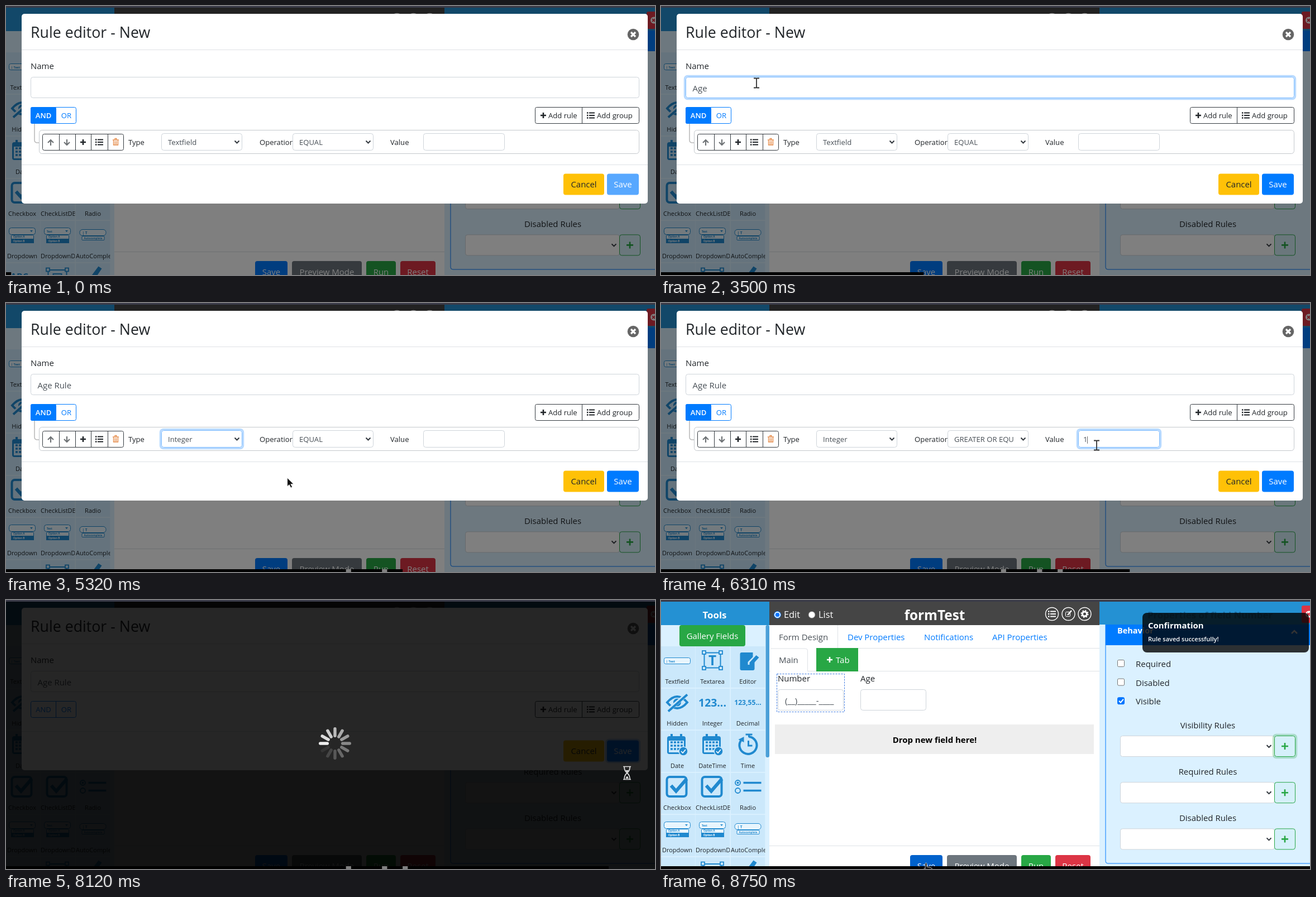
Recreate the animation shown at these times as an HTML page. Size 1162 by 482 pixels, loop 8820 ms.

```html
<!DOCTYPE html>
<html lang="en">
<head>
<meta charset="utf-8">
<title>Rule editor</title>
<style>
html, body { margin: 0; width: 100%; height: 100%; overflow: hidden; background: #000; }
svg { display: block; }
text { font-family: "Open Sans", "Noto Sans", sans-serif; white-space: pre; }
</style>
</head>
<body>
<svg id="stage" width="1162" height="482" viewBox="0 0 1162 482"></svg>
<script>
const LOOP = 8820, STEP = 70;
const BLUE = '#007bff', GREEN = '#28a745', SKY = '#2491d3', ICON = '#2089cf', INK = '#212529', GREY = '#495057', LINE = '#ced4da';
const stage = document.getElementById('stage');

// Drawing helpers, each returns SVG markup
const fill = (x, y, w, h, color, r = 0, extra = '') =>
  `<rect x="${x}" y="${y}" width="${w}" height="${h}" rx="${r}" fill="${color}" ${extra}/>`;
const box = (x, y, w, h, stroke = LINE, color = '#fff', r = 4, extra = '') =>
  fill(x + .5, y + .5, w - 1, h - 1, color, r, `stroke="${stroke}" ${extra}`);
const text = (x, y, str, size = 16, color = INK, extra = '') =>
  `<text x="${x}" y="${y}" font-size="${(size * .935).toFixed(2)}" fill="${color}" ${extra}>${str}</text>`;
const MID = 'text-anchor="middle"', BOLD = 'font-weight="700"';
const mid = (x, y, str, size, color, extra = '') => text(x, y, str, size, color, MID + ' ' + extra);
const line = (d, color, w = 1, extra = '') =>
  `<path d="${d}" fill="none" stroke="${color}" stroke-width="${w}" ${extra}/>`;
const shape = (d, color, extra = '') => `<path d="${d}" fill="${color}" ${extra}/>`;
const circle = (x, y, r, color, extra = '') => `<circle cx="${x}" cy="${y}" r="${r}" fill="${color}" ${extra}/>`;
const move = (x, y, body) => `<g transform="translate(${x} ${y})">${body}</g>`;
const clip = (x, y, w, h, body) => `<svg x="${x}" y="${y}" width="${w}" height="${h}">${body}</svg>`;
const chevron = (x, y) => line(`M${x - 4} ${y - 2}l4 4 4-4`, '#343a40', 2);
const plus = (x, y, color, s = 5) => line(`M${x - s} ${y}h${2 * s}M${x} ${y - s}v${2 * s}`, color, 2.6);
const bullets = (x, y, color = INK, s = 1) =>
  move(x, y, `<g transform="scale(${s})">` + line('M-3-4.5h10M-3 0h10M-3 4.5h10', color, 2) +
    line('M-7-4.5h2.4M-7 0h2.4M-7 4.5h2.4', color, 2.4) + '</g>');
const ring = (x, y, w, h, color = BLUE) =>
  fill(x - 1.5, y - 1.5, w + 3, h + 3, 'none', 5, `stroke="${color}" stroke-opacity=".28" stroke-width="3.4"`);
const button = (x, y, w, label, color, ink = '#fff', extra = '') =>
  `<g ${extra}>${fill(x, y, w, 38, color, 4)}${mid(x + w / 2, y + 24.5, label, 16, ink)}</g>`;
const field = (x, y, w, h, focused) =>
  (focused ? ring(x, y, w, h) : '') + box(x, y, w, h, focused ? '#80bdff' : LINE);
const select = (x, y, w, h, value, focused) =>
  field(x, y, w, h, focused) + chevron(x + w - 9.5, y + h / 2) +
  clip(x, y, w - 26, h, text(12, 20.5, value, 14, GREY));

// Toolbox icons, drawn around the cell centre
const corners = (w, h) => box(-w, -h, 2 * w, 2 * h, ICON, 'none', 0, 'stroke-width="2"') +
  [-w, w].map(x => [-h, h].map(y => fill(x - 3, y - 3, 6, 6, '#cbe8fb', 0, `stroke="${ICON}" stroke-width="1.8"`)).join('')).join('');
const tick = box(-19, -18, 36, 36, ICON, 'none', 5, 'stroke-width="4"') + line('M-11-2l9 10 19-22', ICON, 6);
const calendar = fill(-18, -15, 33, 32, ICON, 4) + line('M-10-19v8M7-19v8', ICON, 4) + fill(-15, -7, 27, 21, '#cbe8fb') +
  [-4, 2, 8].map(y => line(`M-12 ${y}h23`, ICON, 3.5, 'stroke-dasharray="4 2"')).join('') +
  circle(11, 12, 8, ICON, 'stroke="#cbe8fb" stroke-width="1.5"') + line('M7 12l3 3 5-6', '#fff', 1.6);
const combo = label => box(-24, -13, 48, 13, ICON, '#e8f5fd', 4) + text(-19, -4, label, 5, ICON, BOLD) +
  shape('M14-8h5l-2.5 3z', ICON) + box(-20, 0, 41, 15, ICON, '#e8f5fd', 1) + fill(-20, 7, 41, 8, ICON) +
  text(-16, 5, 'Option A', 5, ICON, BOLD) + text(-16, 13, 'Option B', 5, '#fff', BOLD);
const pen = shape('M-14 10q2-10 9-10l5 5q-2 8-14 5zM-2-3L10-19l6 4L4 3z', ICON);
const TOOLS = [
  ['Textfield', box(-24, -5, 48, 12, ICON, '#e8f5fd', 3) + text(-20, 3.5, '| Text', 6, ICON, BOLD)],
  ['Textarea', corners(15, 14) + mid(0, 9, 'T', 26, ICON, BOLD)],
  ['Editor', shape('M-11-14h20v8l-9 9v5h6l6-6v13q0 3-3 3h-20q-3 0-3-3v-26q0-3 3-3z', ICON) + shape('M3 4L15-9l5 4L8 8H3z', ICON)],
  ['Hidden', line('M-18 0Q0-21 18 0Q0 21-18 0z', ICON, 4) + circle(0, 0, 7, ICON) + line('M-16 14L18-15', '#cbe8fb', 7) + line('M-16 16L18-14', ICON, 4)],
  ['Integer', mid(0, 7, '123...', 20.8, ICON, BOLD)],
  ['Decimal', mid(0, 4, '123,55...', 13, ICON, BOLD)],
  ['Date', calendar],
  ['DateTime', calendar],
  ['Time', line('M-11-9A15.500 15.500 0 1 0 2-14', ICON, 4) + line('M-4-18h12M2-18v5M1-7v9h7', ICON, 3) + shape('M-17-9l10-5v10z', ICON)],
  ['Checkbox', tick],
  ['CheckListDB', tick, 62],
  ['Radio', circle(-18, -7, 4.5, 'none', `stroke="${ICON}" stroke-width="1.8"`) + circle(-18, -7, 2, ICON) +
    circle(-18, 7, 4.5, 'none', `stroke="${ICON}" stroke-width="1.8"`) + line('M-8-7h32M-8 7h32', ICON, 3.5)],
  ['Dropdown', combo('')],
  ['DropdownDB', combo('Text'), 62],
  ['AutoComplete', box(-24, -10, 48, 12, ICON, '#e8f5fd', 5) + text(-19, -1, '| T', 7, ICON, BOLD) +
    box(-20, 2, 41, 8, ICON, '#e8f5fd', 1) + text(-16, 8, 'Autocomplete', 5, ICON, BOLD), 125],
  ['', mid(-5, 5, 'ABC', 17, ICON, BOLD)],
  ['', corners(17, 13) + box(-8, -6, 16, 12, ICON, 'none', 0, 'stroke-width="2"')],
  ['', pen]
];

function toolbox() {
  let out = fill(0, 3, 194, 479, '#dbf1ff') + fill(0, 3, 194, 42, SKY) + mid(96, 33, 'Tools', 18, '#fff', BOLD) +
    button(33, 45, 118, 'Gallery Fields', GREEN);
  TOOLS.forEach(([label, icon, left], i) => {
    const col = i % 3, x = [0, 62, 125][col], y = 83 + Math.floor(i / 3) * 75.5;
    const cx = [29, 30, 30.5][col];
    out += clip(x, y, 61.5, 74, fill(0, 0, 61.5, 74, '#cbe8fb') + move(cx, 25, icon) +
      (left ? text(0, 66.5, label, 11.8, INK) : mid(cx, 66.5, label, 11.8, INK)));
  });
  return out + fill(187.5, 45, 6.5, 237, '#4a9fd8', 3);
}

function designer(hover) {
  const radio = (x, on) => circle(x, 26.5, 6, '#fff', `stroke="${on ? '#0075ff' : '#777'}"`) + (on ? circle(x, 26.5, 3.8, '#0075ff') : '');
  const round = (x, icon) => circle(x, 25, 11.5, 'none', 'stroke="#fff" stroke-width="1.4"') + icon;
  return fill(194, 3, 591, 479, '#fff') + fill(194, 3, 591, 42, '#454545') +
    radio(208.5, true) + text(220, 32, 'Edit', 17.5, '#fff') + radio(270, false) + text(282, 32, 'List', 17.5, '#fff') +
    mid(490, 36, 'formTest', 26, '#fff', BOLD) +
    round(700, bullets(700, 25, '#fff')) +
    round(729.5, box(724, 21, 9, 9, '#fff', 'none', 1) + line('M728 27l7-8', '#fff', 2.4)) +
    round(758.5, circle(758.5, 25, 4, 'none', 'stroke="#fff" stroke-width="3"') + circle(758.5, 25, 6, 'none', 'stroke="#fff" stroke-width="2" stroke-dasharray="2.300 2.400"')) +
    line('M316.500 45V86.500H785M194 127.500H785M262.500 127V91q0-4-4-4H196', '#dee2e6') +
    line('M196 127.500H262', '#fff') +
    text(211, 72, 'Form Design', 16, GREY) +
    [[334, 'Dev Properties'], [471, 'Notifications'], [593, 'API Properties']].map(([x, s]) => text(x, 72, s, 16, BLUE)).join('') +
    text(211, 113, 'Main', 16, GREY) + fill(278, 86, 75, 42, GREEN) + plus(302, 107, '#fff') + text(313, 113, 'Tab', 16, '#fff') +
    box(207, 132, 122, 69, '#3f7ae0', 'none', 0, 'stroke-dasharray="3 2"') + text(209, 146, 'Number', 16) + text(357, 146, 'Age', 16) +
    field(209, 160, 118, 38) + field(357, 160, 118, 38) + text(222, 186, '(__)_____-____', 16, GREY) +
    fill(204, 223, 571, 53, '#eee') + mid(490, 256, 'Drop new field here!', 16, '#000', BOLD) +
    line('M194 440.500H785', '#dee2e6') +
    button(446, 457, 58, 'Save', hover ? '#0062cc' : BLUE) + button(512, 457, 125, 'Preview Mode', '#6c757d') +
    button(645, 457, 53, 'Run', GREEN) + button(706, 457, 63, 'Reset', '#dc3545');
}

function properties() {
  const checks = ['Required', 'Disabled', 'Visible'].map((label, i) => {
    const y = 107.5 + i * 33.6, on = i === 2;
    return fill(817.5, y, 12, 12, on ? '#0075ff' : '#fff', 2, `stroke="${on ? '#0075ff' : '#767676'}"`) +
      (on ? line(`M820 ${y + 6}l3 3 5-6`, '#fff', 2) : '') + text(850, y + 12.5, label, 16);
  }).join('');
  const rules = ['Visibility', 'Required', 'Disabled'].map((label, i) => {
    const y = 243 + i * 83.2;
    return mid(979, y - 13.5, label + ' Rules', 16) + box(822, y, 277, 38) + chevron(1088.5, y + 19) +
      (i ? '' : ring(1098, y, 38, 38, GREEN)) + box(1098, y, 38, 38, GREEN, '#d5f0fa') + plus(1117, y + 19, GREEN, 6);
  }).join('');
  return fill(785, 3, 377, 479, '#dbf1ff') + fill(785, 3, 377, 41, SKY) +
    mid(983, 33, 'Properties of field Number', 18, '#1b6ca3', BOLD) +
    line('M796 44V468q0 4 4 4H1162', BLUE) + fill(796, 44, 366, 37, BLUE) +
    text(817, 60, 'Behavior', 15.5, '#fff', BOLD) + line('M1129 60l5-5 5 5', '#fff', 2.5) +
    fill(1147, 10, 20, 31, '#dc3545', 3) + circle(1160, 25.500, 6, '#fff') + line('M1157 23l5 5m0-5l-5 5', '#dc3545', 2) +
    checks + rules;
}

// Timeline
const NAME_KEYS = [840, 1960, 2100, 2660, 3780, 3850, 3990, 4060];
const VALUE_KEYS = [6240, 6580];
const POINTER = [
  [70, 484, 303], [350, 171, 138], [4060, 171, 138], [4410, 366, 249], [4690, 366, 249], [4970, 345, 432],
  [5110, 345, 432], [5460, 590, 249], [5600, 590, 249], [5740, 590, 332], [5880, 590, 332], [6090, 780, 255],
  [6580, 780, 255], [7210, 1112, 310], [8260, 1112, 310], [8680, 475, 471], [LOOP, 475, 471]
];
const CLICKS = [[350, 490], [4480, 4690], [5040, 5110], [5460, 5530], [5810, 5880], [6090, 6160], [7630, 7840]];
const LOADING = 7840, DONE = 8330;
const TYPES = ['AutoComplete', 'Checkbox', 'Date', 'DateTime', 'Decimal', 'Dropdown', 'DropdownDB', 'Email', 'Integer', 'Password', 'Radio'];
const during = (t, a, b) => t >= a && t < b;

function typed(str, keys, t, focused) {
  const n = keys.filter(k => t >= k).length, last = n ? keys[n - 1] : 0;
  const caret = focused && (t - last) % 1060 < 530;
  return str.slice(0, n) + (caret ? '<tspan dx="-.27em" font-weight="300" fill="#000">|</tspan>' : '');
}

function modal(t) {
  const saving = t >= LOADING + STEP, lift = saving ? 49 : 0;
  const nameFocus = during(t, 420, 4690), valueFocus = during(t, 6090, LOADING);
  const off = t < NAME_KEYS[0];
  const rule = () => line('M51 211V240q0 5 5 5h3', '#bbb', 1.6) + box(59, 222, 1075, 43, '#c4c8cc', '#fff', 5) +
    box(65, 229, 146, 30, '#343a40', '#fff', 3) + line('M95.500 229v30M124.500 229v30M152.500 229v30M182.500 229v30', '#343a40') +
    line('M80 250v-10m-5 5l5-5 5 5M109 239v10m-5-5l5 5 5-5', '#6f7376', 2.2) + plus(138, 244, INK) + bullets(167, 244) +
    line('M191 240h11M195 239v-1.500h3v1.500M192.500 241v8h8v-8M195.200 242v6M197.800 242v6', '#e58a48', 1.3) +
    text(219, 249, 'Type', 14) + select(278, 228, 145, 31, t < 5110 ? 'Textfield' : 'Integer', during(t, 4690, 5460)) +
    text(454, 249, 'Operation', 14) + select(513, 228, 145, 31, t < 5880 ? 'EQUAL' : 'GREATER OR EQUAL', during(t, 5460, 6090)) +
    text(688, 249, 'Value', 14) + field(747, 228, 146, 31, valueFocus) + text(756, 249, typed('18', VALUE_KEYS, t, valueFocus && t < 7000), 14, GREY);
  const saveColor = during(t, 7210, LOADING) ? '#0062cc' : BLUE;
  return fill(28, 14, 1121, 340 - lift, '#fff', 5) + text(44, 57, 'Rule editor - New', 28.6, INK, 'font-weight="500"') +
    circle(1123, 51, 10.300, '#666') + line('M1119 47l8 8m0-8l-8 8', '#fff', 3.2) + line('M28 78.500H1149', '#dee2e6') +
    text(44, 113, 'Name', 16) + field(44, 127, 1090, 38, nameFocus) +
    text(56.5, 153, typed('Age Rule', NAME_KEYS, t, nameFocus && t < 4200), 16, GREY) +
    box(44, 181, 82, 30, BLUE, '#fff', 3) + (saving ? line('M89.500 181v30', BLUE) : fill(44, 181, 46, 30, BLUE, 3)) +
    mid(67, 201, 'AND', 14, saving ? BLUE : '#fff', saving ? '' : 'font-weight="600"') + mid(108, 201, 'OR', 14, BLUE) +
    box(947, 181, 187, 30, '#343a40', '#fff', 3) + line('M1031.500 181v30', '#343a40') +
    plus(962, 196, INK) + text(971, 201, 'Add rule', 14) + bullets(1047, 196) + text(1058, 201, 'Add group', 14) +
    (saving ? '' : rule()) +
    move(0, -lift, line('M28 284.500H1149', '#dee2e6') + button(998, 300.5, 73, 'Cancel', '#ffc107', INK) +
      (saving ? ring(1076, 301, 57, 37) : '') + button(1076, 300.5, 57, 'Save', saveColor, '#fff', off ? 'opacity=".65"' : '')) +
    (during(t, 4550, 5110) ? box(278, 259, 145, 230, '#555', '#fff', 0) +
      TYPES.map((s, i) => text(290.5, 274.5 + i * 19.83, s, 14, GREY)).join('') : '');
}

function spinner(t) {
  const head = 6 - Math.round((t - 8120) / STEP);
  let out = '';
  for (let i = 0; i < 12; i++) {
    const age = ((i - head) % 12 + 12) % 12;
    out += fill(11, -2.7, 18, 5.4, '#fff', 2.7, `opacity="${(.92 - age * .077).toFixed(2)}" transform="rotate(${i * 30})"`);
  }
  return move(589, 257, out);
}

function toast(t) {
  return `<g opacity="${Math.min(1, (t - DONE) / 280)}">` + fill(862, 23, 298, 71, '#000', 8, 'fill-opacity=".8"') +
    text(872, 51, 'Confirmation', 16, '#fff', BOLD) + text(872, 74, 'Rule saved successfully!', 11.8, '#fff', 'font-weight="600"') + '</g>';
}

function pointerAt(t) {
  const i = POINTER.findIndex(p => p[0] > t), [t0, x0, y0] = POINTER[i - 1], [t1, x1, y1] = POINTER[i];
  const u = (t - t0) / (t1 - t0), e = u * u * (3 - 2 * u);
  return [x0 + (x1 - x0) * e, y0 + (y1 - y0) * e];
}

const CURSORS = {
  arrow: shape('M0 0v15l3.500-3 2.700 5.500 2.500-1.200L6 11h5z', '#111', 'stroke="#fff" stroke-width=".6"'),
  beam: line('M-5-8.500h4l1 1 1-1h4M-5 8.500h4l1-1 1 1h4M0-7.500v15', '#333', 1.8),
  hand: shape('M-2 1q1.500-2 3 0v6l7 1.500q3 1 2.500 4l-1.500 6h-7l-6-8q1-2 2 0z', '#111', 'stroke="#fff" stroke-width=".7"'),
  wait: line('M-7-11.500h14M-7 11.500h14M-5-11q0 7 5 11q5-4 5-11M-5 11q0-7 5-11q5 4 5 11', '#ddd', 1.7) + shape('M-3 10l3-5 3 5zM-3-5h6l-3 4z', '#ddd')
};

function pointer(t) {
  if (t < POINTER[0][0]) return '';
  const [x, y] = pointerAt(t);
  const overInput = during(y, 127, 165) || (during(x, 747, 893) && during(y, 228, 260));
  const kind = during(t, LOADING, DONE) ? 'wait'
    : t < LOADING && overInput ? 'beam'
    : (t < LOADING && x > 1076 && y > 300) || t >= 8680 ? 'hand' : 'arrow';
  const lit = CLICKS.some(([a, b]) => during(t, a, b));
  return (lit ? circle(x, y - 2, 12, '#fbe738', 'opacity=".72"') : '') + move(x, y, CURSORS[kind]);
}

// Bottom progress strip, with a few segments it skips over
function progress(k) {
  const w = 1162 / 126;
  return fill(0, 477, (k + 1) * w, 5, '#000') +
    [66, 73, 77].filter(s => k >= s && k * STEP < DONE).map(s => fill(s * w, 477, w, 5, '#808080')).join('');
}

function render(k) {
  const t = k * STEP, open = t < DONE;
  const veil = o => fill(0, 3, 1162, 479, '#000', 0, `opacity="${o}"`);
  stage.innerHTML = toolbox() + designer(t >= 8680) + properties() + (open ? veil(.5) + modal(t) : toast(t)) +
    (during(t, LOADING, DONE) ? veil(Math.min(.85, .4 + (t - LOADING) / 200)) + spinner(t) : '') +
    fill(0, 0, 1162, 3, '#3a3b48') + progress(k) + pointer(t);
}

let start, shown = -1;
function tick70(now) {
  start ??= now;
  const k = Math.floor((now - start) % LOOP / STEP);
  if (k !== shown) render(shown = k);
  requestAnimationFrame(tick70);
}
render(0);
requestAnimationFrame(tick70);
</script>
</body>
</html>
```
